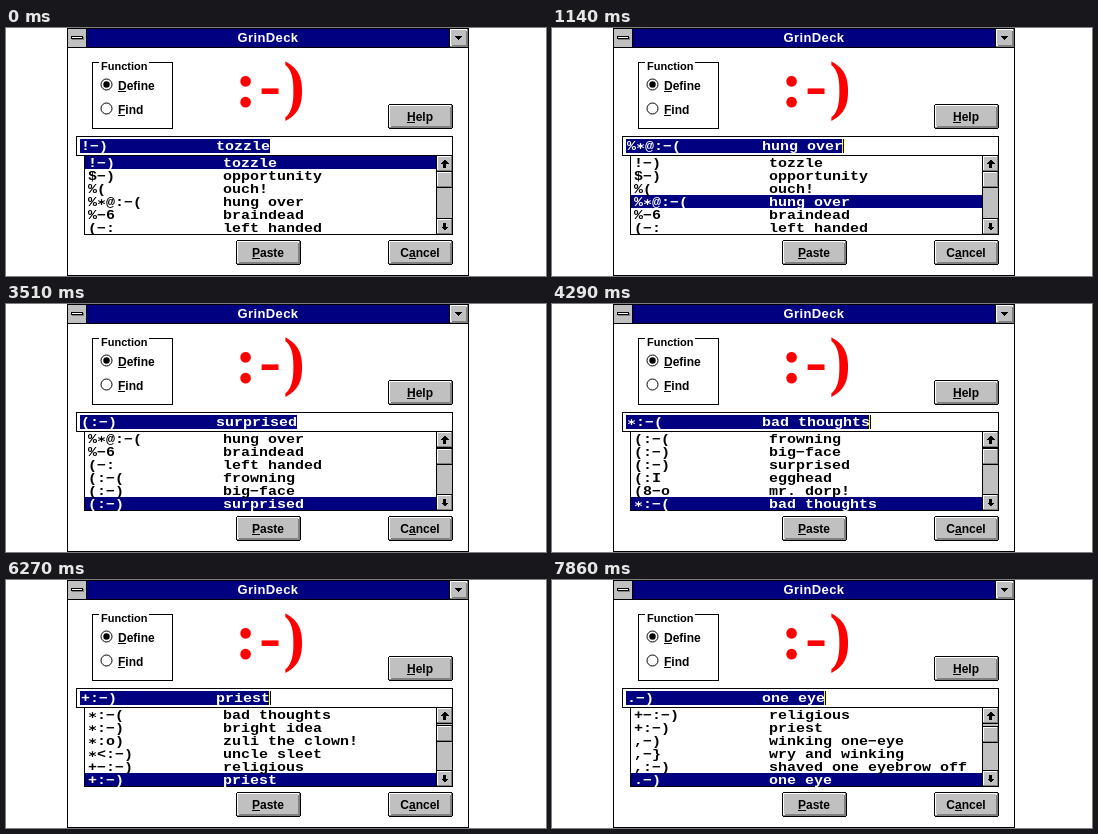
An HTML page that plays this animation: 540 px wide and 248 px high, repeating every 8 s.

```html
<!DOCTYPE html>
<html lang="en">
<head>
<meta charset="utf-8">
<title>GrinDeck</title>
<style>
html, body { margin: 0; width: 100%; height: 100%; overflow: hidden; background: #fff; }
svg { display: block; width: 540px; height: 248px; }
rect, .crisp { shape-rendering: crispEdges; }
text { font-family: "Liberation Sans", Arial, sans-serif; font-weight: bold; }
.mono { font: bold 15px "Liberation Mono", "DejaVu Sans Mono", monospace; }
.face { font: bold 65px "Liberation Serif", "Times New Roman", serif; letter-spacing: 2.5px; }
</style>
</head>
<body>
<svg id="stage" viewBox="0 0 540 248"></svg>
<script>
const NAVY = '#000080', GRAY = '#c0c0c0', DARK = '#808080', RED = '#ff0000';
const LOOP = 8000, ROWS = 6, ROW_H = 13, LIST_Y = 128, TAB = 135, CHAR_W = 9;
const SQUASH = 0.84;

const items = [
  ['!-)', 'tozzle'], ['$-)', 'opportunity'], ['%(', 'ouch!'],
  ['%*@:-(', 'hung over'], ['%-6', 'braindead'], ['(-:', 'left handed'],
  ['(:-(', 'frowning'], ['(:-)', 'big-face'], ['(:-)', 'surprised'],
  ['(:I', 'egghead'], ['(8-o', 'mr. dorp!'], ['*:-(', 'bad thoughts'],
  ['*:-)', 'bright idea'], ['*:o)', 'zuli the clown!'], ['*<:-)', 'uncle sleet'],
  ['+-:-)', 'religious'], ['+:-)', 'priest'], [',-)', 'winking one-eye'],
  [',-}', 'wry and winking'], [',:-)', 'shaved one eyebrow off'], ['.-)', 'one eye']
];

// [time of selection, how long the caret is hidden before it]
const moves = [
  [450, 0], [750, 0], [1140, 30], [1530, 30], [1920, 0], [2340, 60], [2730, 30],
  [3150, 30], [3540, 30], [3900, 30], [4290, 30], [4650, 30], [5010, 0], [5430, 0],
  [5850, 90], [6270, 60], [6660, 30], [7050, 30], [7470, 0], [7860, 0]
];
const thumbMoves = [3150, 5010, 7860];

const stage = document.getElementById('stage');

function add(tag, attrs, parent = stage) {
  const el = document.createElementNS('http://www.w3.org/2000/svg', tag);
  for (const k in attrs) el.setAttribute(k, attrs[k]);
  parent.appendChild(el);
  return el;
}
const box = (x, y, width, height, fill, parent) =>
  add('rect', { x, y, width, height, fill }, parent);

function frame(x, y, w, h, fill = '#fff') {
  box(x, y, w, h, '#000');
  return box(x + 1, y + 1, w - 2, h - 2, fill);
}

function label(str, x, y, size, attrs = {}) {
  const el = add('text', { x, y, 'font-size': size, ...attrs });
  el.textContent = str;
  return el;
}

// Raised gray face without its black outline
function raised(x, y, w, h, depth, parent) {
  box(x, y, w, h, DARK, parent);
  box(x, y, w - 1, h - 1, '#fff', parent);
  add('path', {
    class: 'crisp', fill: DARK,
    d: `M${x + w} ${y}V${y + h}H${x}l${depth} ${-depth}H${x + w - depth}V${y + depth}Z`
  }, parent);
  box(x + 1, y + 1, w - 1 - depth, h - 1 - depth, GRAY, parent);
}

function button(str, x, y, lineX, lineW) {
  box(x + 1, y, 63, 25, '#000');
  box(x, y + 1, 65, 23, '#000');
  raised(x + 1, y + 1, 63, 23, 2);
  label(str, x + 32, y + 17, 12, { 'text-anchor': 'middle' });
  box(lineX, y + 18, lineW, 1, '#000');
}

function radio(y, str, lineW, on) {
  add('circle', { cx: 100.5, cy: y, r: 5.5, fill: '#fff', stroke: '#000' });
  if (on) add('circle', { cx: 100.5, cy: y, r: 3.2 });
  label(str, 112, y + 5.5, 12);
  box(112, y + 6.5, lineW, 1, '#000');
}

// Long dashes and centred stars, as in the window's fixed-width font
const wide = str => str.replace(/-/g, '\u2212').replace(/\*/g, '\u2217');

function monoLine(parent) {
  const g = add('g', {}, parent);
  const part = x => add('text', { x, y: 0, class: 'mono' }, g);
  const code = part(0), name = part(TAB);
  return {
    set(item, x, y, fill) {
      g.setAttribute('transform', `translate(${x} ${y}) scale(1 ${SQUASH})`);
      g.setAttribute('fill', fill);
      code.textContent = wide(item[0]);
      name.textContent = wide(item[1]);
    }
  };
}

// Window and title bar
frame(61, 0, 402, 248);
box(62, 1, 400, 18, NAVY);
box(62, 19, 400, 1, '#000');
box(62, 1, 18, 18, GRAY);
box(80, 1, 1, 18, '#000');
box(66, 9, 12, 3, DARK);
frame(65, 8, 12, 3);
box(443, 1, 1, 18, '#000');
raised(444, 1, 18, 18, 2);
add('path', { class: 'crisp', d: 'M449 8h7l-3.5 4z' });
label('GrinDeck', 262, 14, 13, { fill: '#fff', 'text-anchor': 'middle', 'letter-spacing': 0.4 });

// Function group
frame(86, 34, 81, 67);
box(93, 34, 50, 1, '#fff');
label('Function', 95, 42, 11);
radio(56.5, 'Define', 8, true);
radio(80.5, 'Find', 7, false);

// Big face
const face = add('text', { class: 'face', x: 229, y: 79, fill: RED });
const eyes = add('tspan', {}, face);
eyes.textContent = ':';
add('tspan', {}, face).textContent = '-)';
const blink = box(238, 35, 5, 58, RED);

button('Help', 382, 76, 401, 8);
button('Paste', 230, 212, 246, 8);
button('Cancel', 382, 212, 403, 7);

// Edit field
frame(70, 108, 377, 20);
const mark = box(74, 111, 0, 14, NAVY);
const editLine = monoLine(stage);
const caret = add('g', {});
box(-1, 111, 1, 14, '#ffff00', caret);
box(0, 111, 1, 14, '#000', caret);

// List and scroll bar
frame(78, 127, 369, 80);
const bar = box(79, 0, 351, ROW_H, NAVY);
const lines = Array.from({ length: ROWS }, () => monoLine(stage));

box(430, 128, 1, 78, '#000');
box(431, 128, 15, 78, GRAY);
raised(431, 128, 15, 15, 1);
box(431, 143, 15, 1, '#000');
add('path', { class: 'crisp', d: 'M438.5 131.5l4 4h-2.5v4h-3v-4h-2.5z' });
box(431, 190, 15, 1, '#000');
raised(431, 191, 15, 15, 1);
add('path', { class: 'crisp', d: 'M438.5 202.5l4-4h-2.5v-4h-3v4h-2.5z' });
const thumb = add('g', {});
box(431, 0, 15, 17, '#000', thumb);
raised(431, 1, 15, 15, 1, thumb);

const show = (el, on) => el.setAttribute('visibility', on ? 'visible' : 'hidden');

function draw(t) {
  const sel = moves.filter(m => t >= m[0]).length;
  const top = Math.max(0, sel - ROWS + 1);
  const item = items[sel];
  const end = 75 + TAB + item[1].length * CHAR_W;

  mark.setAttribute('width', end - 74);
  editLine.set(item, 75, 122, '#fff');
  caret.setAttribute('transform', `translate(${end} 0)`);
  show(caret, t >= 180 && !moves.some(([at, gap]) => t >= at - gap && t < at));

  bar.setAttribute('y', LIST_Y + (sel - top) * ROW_H);
  lines.forEach((line, i) => {
    const n = top + i;
    line.set(items[n], 82, LIST_Y + i * ROW_H + 11, n === sel ? '#fff' : '#000');
  });

  const shift = thumbMoves.filter(at => t >= at).length;
  thumb.setAttribute('transform', `translate(0 ${143 + shift})`);

  const shut = t >= 7470 && t < 7650;
  show(blink, shut);
  show(eyes, !shut);
}

const start = performance.now();
function tick() {
  draw((performance.now() - start) % LOOP);
  requestAnimationFrame(tick);
}
tick();
</script>
</body>
</html>
```
